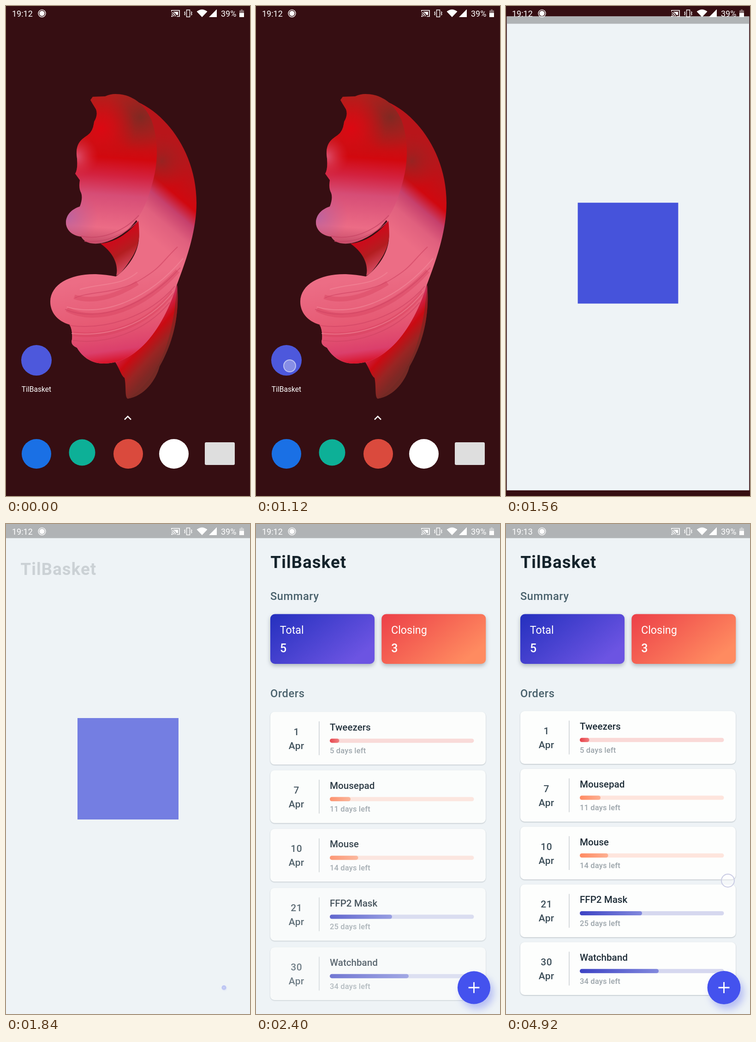
An HTML page that plays this animation: 529 by 1058 pixels, repeating every 7.16 s.

```html
<!DOCTYPE html>
<html lang="en">
<head>
<meta charset="utf-8">
<title>TilBasket</title>
<style>
  html, body { margin: 0; height: 100%; overflow: hidden; background: #360e12; }
  svg { display: block; width: 100vw; height: 100vh; }
  text { font-family: Roboto, sans-serif; }
  .mid { font-weight: 500; }
  .head { font-weight: 500; font-size: 23.7px; letter-spacing: .55px; fill: #48606b; }
  .tile rect { filter: drop-shadow(0 4px 5px rgba(60, 75, 90, .36)); }
  .tile text { fill: #fff; font-size: 23.3px; }
  .tile .mid { font-size: 25px; }
  .item > rect:first-child { filter: drop-shadow(0 1.3px 1.2px rgba(30, 45, 60, .3)); }
  .date { font-size: 21px; letter-spacing: .4px; fill: #3b4d58; text-anchor: middle; }
  .name { font-size: 20.6px; fill: #1d2c37; }
  .left { font-size: 16.5px; letter-spacing: .15px; fill: #9ba4aa; }
  #fab circle { filter: drop-shadow(7px 11px 8px rgba(68, 82, 239, .33)); }
</style>
</head>
<body>
<svg viewBox="0 0 529 1058" preserveAspectRatio="none">
  <defs>
    <linearGradient id="body" gradientUnits="userSpaceOnUse" x1="400" y1="350" x2="290" y2="480">
      <stop stop-color="#b8151a"/><stop offset=".38" stop-color="#d0080f"/>
      <stop offset=".55" stop-color="#c6406c"/><stop offset=".75" stop-color="#e0607e"/>
      <stop offset="1" stop-color="#ec6d85"/>
    </linearGradient>
    <radialGradient id="dusk" gradientUnits="userSpaceOnUse" cx="338" cy="335" r="62">
      <stop stop-color="#962322" stop-opacity=".95"/><stop offset="1" stop-color="#b01c1e" stop-opacity="0"/>
    </radialGradient>
    <linearGradient id="base" gradientUnits="userSpaceOnUse" x1="200" y1="590" x2="225" y2="772">
      <stop stop-color="#e0506e" stop-opacity="0"/><stop offset=".5" stop-color="#e24c66" stop-opacity=".55"/>
      <stop offset=".85" stop-color="#d83767" stop-opacity=".85"/><stop offset="1" stop-color="#d80f22"/>
    </linearGradient>
    <linearGradient id="crown" gradientUnits="userSpaceOnUse" x1="255" y1="190" x2="232" y2="512">
      <stop stop-color="#b0201d"/><stop offset=".25" stop-color="#b81a1a"/>
      <stop offset=".43" stop-color="#d2080e"/><stop offset=".55" stop-color="#d3223f"/>
      <stop offset=".68" stop-color="#d64d76"/><stop offset=".9" stop-color="#ec6c86"/>
      <stop offset="1" stop-color="#c94f6b"/>
    </linearGradient>
    <radialGradient id="shade" gradientUnits="userSpaceOnUse" cx="292" cy="240" r="75">
      <stop stop-color="#7a2a23" stop-opacity=".9"/><stop offset="1" stop-color="#952320" stop-opacity="0"/>
    </radialGradient>
    <radialGradient id="glow" gradientUnits="userSpaceOnUse" cx="205" cy="265" r="75">
      <stop stop-color="#dc0812"/><stop offset=".4" stop-color="#d80a12" stop-opacity=".7"/>
      <stop offset="1" stop-color="#d00a10" stop-opacity="0"/>
    </radialGradient>
    <radialGradient id="tint" gradientUnits="userSpaceOnUse" cx="135" cy="455" r="65">
      <stop stop-color="#b063a8" stop-opacity=".75"/><stop offset="1" stop-color="#c25a90" stop-opacity="0"/>
    </radialGradient>
    <radialGradient id="rose" gradientUnits="userSpaceOnUse" cx="152" cy="325" r="48">
      <stop stop-color="#dd5878" stop-opacity=".95"/><stop offset="1" stop-color="#d62a40" stop-opacity="0"/>
    </radialGradient>
    <linearGradient id="fold" gradientUnits="userSpaceOnUse" x1="235" y1="500" x2="278" y2="568">
      <stop stop-color="#d0081a"/><stop offset=".45" stop-color="#b41d20"/><stop offset="1" stop-color="#db5570"/>
    </linearGradient>
    <linearGradient id="tail" gradientUnits="userSpaceOnUse" x1="275" y1="715" x2="335" y2="770">
      <stop stop-color="#cf2a58"/><stop offset=".35" stop-color="#cb0a12"/>
      <stop offset=".7" stop-color="#9a2523"/><stop offset="1" stop-color="#7c2925"/>
    </linearGradient>
    <linearGradient id="blueTile" x2="1" y2=".6"><stop stop-color="#2430be"/><stop offset="1" stop-color="#6c54e2"/></linearGradient>
    <linearGradient id="redTile" x2="1" y2=".6"><stop stop-color="#ec3f48"/><stop offset="1" stop-color="#ff8b60"/></linearGradient>
    <linearGradient id="red"><stop stop-color="#e63f48"/><stop offset="1" stop-color="#f07a7b"/></linearGradient>
    <linearGradient id="orange"><stop stop-color="#ff8a62"/><stop offset="1" stop-color="#fdb092"/></linearGradient>
    <linearGradient id="blue"><stop stop-color="#3d43c4"/><stop offset="1" stop-color="#8289dd"/></linearGradient>
    <clipPath id="crop"><rect id="cropBox" width="529" height="1058"/></clipPath>
  </defs>

  <rect width="529" height="1058" fill="#360e12"/>

  <g id="wallpaper">
    <path fill="url(#tail)" d="M236 768C285 755 335 700 371 602C378 680 355 740 333 778C325 808 300 842 264 848C257 845 261 822 257 803C250 799 245 780 236 768Z"/>
    <path fill="#6d2a25" d="M371 602C378 680 355 740 333 778C325 808 300 842 264 848C330 805 362 730 371 602Z" opacity=".5"/>
    <g id="swirl"></g>
    <g fill="none">
      <path stroke="#d23a58" stroke-width="10" opacity=".35" d="M132 655C200 690 300 652 372 572M148 628C185 640 235 630 285 598M146 708C220 718 305 690 362 618"/>
      <path stroke="#cf4463" stroke-width="2" opacity=".6" d="M150 630C180 616 240 622 290 592S335 555 372 520M128 655C200 685 300 650 378 565M138 690C220 700 310 670 366 605M145 722C215 732 300 705 355 640"/>
      <path stroke="#f48a9c" stroke-width="2" opacity=".6" d="M132 650C215 672 310 632 384 545M142 707C220 715 305 690 362 618M160 612C205 598 250 605 285 575"/>
    </g>
    <path fill="url(#fold)" d="M205 513C238 510 266 490 287 464C291 500 290 520 265 555C255 570 246 580 239 582C244 562 236 535 205 513Z"/>
    <g id="top"></g>
    <path fill="none" stroke="#c64464" stroke-width="2" opacity=".7" d="M163 497C205 506 255 488 288 452M170 508C215 512 255 495 285 466"/>
  </g>

  <g id="home">
    <circle cx="66" cy="765" r="33" fill="#4d58dc"/>
    <text x="66" y="833" font-size="15.6" fill="#fff" text-anchor="middle">TilBasket</text>
    <path d="M257 893l7-7l7 7" fill="none" stroke="#fff" stroke-width="2.5"/>
    <circle cx="66" cy="967" r="32" fill="#1a70e5"/>
    <circle cx="165" cy="964" r="28.5" fill="#0db097"/>
    <circle cx="265" cy="967" r="32" fill="#da4a3d"/>
    <circle cx="364" cy="967" r="32" fill="#fff"/>
    <rect x="431" y="942" width="65" height="49" rx="3" fill="#dedede"/>
  </g>
  <circle id="tap" cx="73" cy="777" r="13" fill="#dfe0f4" fill-opacity=".4" stroke="#fff" stroke-opacity=".55" stroke-width="2"/>

  <g id="win"><g clip-path="url(#crop)">
    <rect width="529" height="1058" fill="#eef3f6"/>
    <rect width="529" height="30.5" fill="#b0b3b5"/>
    <rect id="logo" x="155" y="419" width="219" height="219" fill="#4653db"/>
    <text id="title" x="31.5" y="95" font-size="36.5" font-weight="700" letter-spacing="1.1" fill="#14232b">TilBasket</text>
    <text id="summary" class="head" x="31" y="164">Summary</text>
    <g id="tiles"></g>
    <text id="orders" class="head" x="31" y="373.5">Orders</text>
    <g id="list"></g>
    <g id="fab">
      <circle r="36" fill="#4452ee"/>
      <path d="M-12 0H12M0-12V12" stroke="#fff" stroke-width="2.8"/>
    </g>
    <circle id="ring" cx="481" cy="770" r="14" fill="#fff" fill-opacity=".35" stroke="#c9cbe4" stroke-width="2"/>
  </g></g>

  <g fill="#fff" font-size="18">
    <text id="clock" x="13" y="22.5"></text>
    <circle cx="78" cy="16" r="5.7"/>
    <circle cx="78" cy="16" r="7.9" fill="none" stroke="#fff" stroke-width="1.4"/>
    <path d="M359 12V9.5H376V22.5H370M359 14.5a8 8 0 0 1 8 8M359 18a4.5 4.5 0 0 1 4.5 4.5" fill="none" stroke="#fff" stroke-width="1.7"/>
    <path d="M363 12.5H373V19.5H369.5A10 10 0 0 0 363 13.5Z"/>
    <circle cx="359.8" cy="22" r="1.5"/>
    <path d="M391.5 8.5H398.5V23.5H391.5ZM388.5 12l-1.5 2l1.5 2l-1.5 2l1.5 2M401.5 12l1.5 2l-1.5 2l1.5 2l-1.5 2" fill="none" stroke="#fff" stroke-width="1.4"/>
    <path d="M413.5 12Q425 3 436.5 12L425 24ZM457 7V24H440Z"/>
    <text x="466" y="22.5">39%</text>
    <path d="M506 9.5H509V7.5H513V9.5H516V15H506Z" opacity=".4"/>
    <rect x="506" y="15" width="10" height="9"/>
  </g>
</svg>
<script>
const LOOP = 7160, OPEN = 1240;
const $ = id => document.getElementById(id);
const clamp = v => Math.max(0, Math.min(1, v));
const easeOut = (p, n) => 1 - (1 - clamp(p)) ** n;
const show = (el, alpha) => el.setAttribute('opacity', clamp(alpha));
const move = (el, value) => el.setAttribute('transform', value);

// One outline painted with several fills in turn
const paint = (d, ...fills) => fills.map(f => `<path d="${d}" fill="url(#${f})"/>`).join('');
$('swirl').innerHTML = paint('M285 207C350 235 413 320 413 425C413 485 392 545 370 603C345 685 290 772 212 772C180 772 162 752 154 738Q139 732 143 720Q145 702 138 688C110 680 96 660 96 638C97 600 140 578 195 579Q218 580 238 584C262 568 292 530 288 490L284 464L255 440L270 250Z', 'body', 'dusk', 'base');
$('top').innerHTML = paint('M183 203L188 196L215 195Q226 190 237 190C278 190 302 217 315 245C331 290 331 340 315 390C302 440 278 482 235 502C205 518 172 517 163 498C142 496 129 482 130 465C132 448 145 438 160 433Q167 415 163 404Q157 394 160 376L150 362Q157 350 153 320C152 292 168 286 178 278Q189 270 191 250Q200 235 195 223L187 210Z', 'crown', 'shade', 'glow', 'rose', 'tint');

const tile = (x, fill, label, count) => `<g class="tile">
  <rect x="${x}" y="194.5" width="226" height="107.5" rx="10" fill="url(#${fill})"/>
  <text x="${x + 20.7}" y="237">${label}</text>
  <text class="mid" x="${x + 21}" y="277">${count}</text></g>`;
$('tiles').innerHTML = tile(31, 'blueTile', 'Total', 5) + tile(272.3, 'redTile', 'Closing', 3);

const TRACK = { red: '#fad9d7', orange: '#fee5dd', blue: '#d6d8ef' };
const items = [
  [1, 'Tweezers', 5, 20.5, 'red'],
  [7, 'Mousepad', 11, 45, 'orange'],
  [10, 'Mouse', 14, 61.5, 'orange'],
  [21, 'FFP2 Mask', 25, 135, 'blue'],
  [30, 'Watchband', 34, 171, 'blue']
];
$('list').innerHTML = items.map(([day, name, left, width, hue], i) => `<g>
  <g class="item" transform="translate(0 ${404 + i * 124.75})">
    <rect x="31" width="467" height="114" rx="9" fill="#fdfefd"/>
    <text class="date mid" x="87.7" y="50">${day}</text>
    <text class="date mid" x="87.7" y="80">Apr</text>
    <rect x="136.2" y="20.5" width="1.5" height="73" fill="#c8cdd0"/>
    <text class="name mid" x="160" y="40">${name}</text>
    <rect x="160" y="57.8" width="312.5" height="9" rx="4.5" fill="${TRACK[hue]}"/>
    <rect x="160" y="57.8" width="${width}" height="9" rx="4.5" fill="url(#${hue})"/>
    <text class="left mid" x="160" y="89.7">${left} days left</text>
  </g></g>`).join('');

// element, start, duration, rise
const entries = [
  [$('title'), 1818, 400, 18],
  [$('summary'), 2009, 400, 36],
  [$('tiles'), 2037, 400, 38],
  [$('orders'), 2106, 400, 36],
  ...[...$('list').children].map((el, i) => [el, 2155 + i * 30, 380, 36])
];

function draw(t) {
  const since = t - OPEN, p = since / 500;

  show($('home'), 1 - since / 190);
  move($('home'), `translate(0 ${-80 * easeOut(since / 350, 2)})`);
  show($('tap'), t < 1120 ? 0 : 1 - (t - 1200) / 80);

  const mix = (a, b, n) => a + (b - a) * easeOut(p, n);
  const height = mix(529, 1058, 2.83);
  show($('win'), (since - 30) / 60);
  move($('win'), `translate(${mix(66, 264.5, 9.1)} ${mix(765, 529, 3.75)}) scale(${mix(.125, 1, 4.97)}) translate(-264.5 -529)`);
  $('cropBox').setAttribute('y', 529 - height / 2);
  $('cropBox').setAttribute('height', height);
  show($('logo'), 1 - (t - 1780) / 215);

  for (const [el, start, span, rise] of entries) {
    const e = easeOut((t - start) / span, 3);
    show(el, e);
    move(el, `translate(0 ${rise * (1 - e)})`);
  }

  const grow = easeOut((t - 1790) / 685, 2);
  show($('fab'), grow * 2);
  move($('fab'), `translate(472.5 1001) scale(${grow})`);

  show($('ring'), t >= 4920 ? 1 : 0);
  $('clock').textContent = t < 2560 ? '19:12' : '19:13';
}

let begin;
function tick(now) {
  begin ??= now;
  draw((now - begin) % LOOP);
  requestAnimationFrame(tick);
}
draw(0);
requestAnimationFrame(tick);
</script>
</body>
</html>
```
